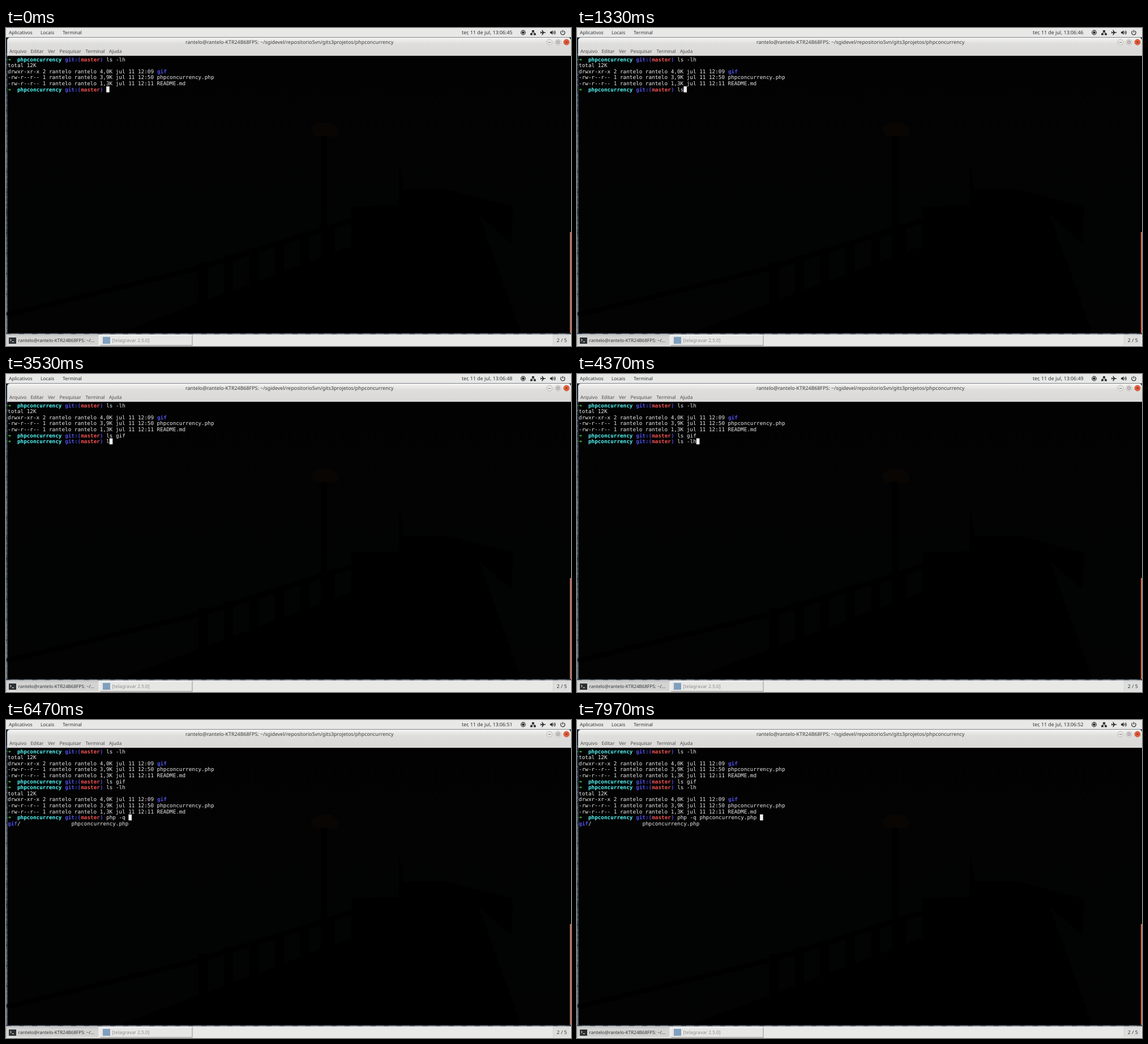
An HTML page with a canvas for the animation above (8 s loop, 998 by 561 pixels).

```html
<!DOCTYPE html>
<html lang="pt">
<head>
<meta charset="utf-8">
<title>Terminal</title>
<style>
html, body { margin: 0; width: 100%; height: 100%; overflow: hidden; background: #000; }
canvas { display: block; }
</style>
</head>
<body>
<canvas id="stage" width="998" height="561"></canvas>
<script>
const ctx = document.getElementById('stage').getContext('2d');
const LOOP = 8000;
const UI = '"Noto Sans", "Open Sans", sans-serif';
const MONO = '"DejaVu Sans Mono", monospace';
const CELL = { x: 3.1, y: 49.9, w: 5.614, h: 10.604 };
const COLOR = { text: '#ececec', green: '#4fe64f', cyan: '#55f5f5', blue: '#5050e6', red: '#ee5151' };
const PROMPT_COLS = 31;

const USER = 'rantelo';
const LOGIN = USER + '@' + USER + '-KTR24B68FPS: ~/';

// Each session line: row, time the prompt appears, and timed keystrokes.
const session = [
  { row: 0, start: 0, keys: [[0, 'ls -lh']] },
  { row: 5, start: 0, keys: [[1070, 'l'], [1200, 's'], [1800, ' '], [2000, 'g'], [2170, 'i'], [2370, 'f']] },
  { row: 6, start: 2870, keys: [[3430, 'l'], [3600, 's'], [3730, ' '], [3870, '-'], [4030, 'l'], [4130, 'h']] },
  { row: 11, start: 4430, keys: [[4770, 'p'], [4900, 'h'], [5030, 'p'], [5170, ' '], [5600, '-'], [5800, 'q'],
    [5970, ' '], [6900, 'p'], [7070, 'h'], [7200, 'p'], [7430, 'concurrency.php ']] }
];
const LIST_TIME = 4430, COMPLETION_TIME = 6270;

function rect(x, y, w, h, color) {
  ctx.fillStyle = color;
  ctx.fillRect(x, y, w, h);
}

function shape(points, color) {
  ctx.fillStyle = color;
  ctx.beginPath();
  points.forEach(([x, y]) => ctx.lineTo(x, y));
  ctx.fill();
}

function line(points, color, width = 1) {
  ctx.strokeStyle = color;
  ctx.lineWidth = width;
  ctx.beginPath();
  points.forEach(([x, y], i) => i ? ctx.lineTo(x, y) : ctx.moveTo(x, y));
  ctx.stroke();
}

function disc(x, y, r, fill, stroke) {
  ctx.beginPath();
  ctx.arc(x, y, r, 0, 7);
  ctx.fillStyle = fill;
  ctx.fill();
  if (stroke) {
    ctx.strokeStyle = stroke;
    ctx.lineWidth = 0.8;
    ctx.stroke();
  }
}

function arc(x, y, r, from, to, color, width = 1) {
  ctx.strokeStyle = color;
  ctx.lineWidth = width;
  ctx.beginPath();
  ctx.arc(x, y, r, from, to);
  ctx.stroke();
}

function vertical(y0, y1, ...colors) {
  const gradient = ctx.createLinearGradient(0, y0, 0, y1);
  colors.forEach((c, i) => gradient.addColorStop(i / (colors.length - 1), c));
  return gradient;
}

function label(text, x, y, size = 8.3, color = '#303436', weight = 400, align = 'left') {
  ctx.font = `${weight} ${size}px ${UI}`;
  ctx.textAlign = align;
  ctx.fillStyle = color;
  ctx.fillText(text, x, y);
}

function mono(text, col, row, color = 'text', bold = false) {
  ctx.font = `${bold ? 'bold ' : ''}9.325px ${MONO}`;
  ctx.textAlign = 'left';
  ctx.fillStyle = COLOR[color];
  ctx.fillText(text, CELL.x + col * CELL.w, CELL.y + row * CELL.h + 8.7);
}

function wallpaper() {
  rect(0, 16, 998, 526, vertical(16, 541, '#17222e', '#34465a', '#59666e', '#36434c', '#546776', '#6d7880'));
  for (let y = 45; y < 540; y += 9) {
    rect(0, y, 2, 3, y % 4 ? 'rgba(150,165,175,.3)' : 'rgba(15,25,35,.45)');
  }
  for (let x = 0; x < 998; x += 23) rect(x, 538, 9, 3, 'rgba(20,30,60,.4)');
}

function terminalBackground() {
  rect(2.5, 49, 995.5, 489.5, vertical(49, 538, '#020202', '#030304', '#020303', '#030303'));
  shape([[538, 178], [550, 168], [575, 167], [588, 180], [584, 192], [545, 191]], '#090502');
  rect(556, 190, 11, 250, '#000');
  shape([[610, 315], [693, 313], [695, 238], [702, 285], [780, 285], [835, 300], [895, 315], [893, 380],
    [835, 330], [910, 538], [200, 538], [610, 385]], '#000');
  line([[2, 506], [340, 424], [610, 340]], '#000', 9);
  for (let x = 340; x < 610; x += 45) rect(x, 505 - x * 0.27, 16, 110, '#000');
}

function topPanel(seconds) {
  rect(0, 0, 998, 16.5, '#e8e8e7');
  label('Aplicativos', 5, 11.2);
  label('Locais', 61, 11.2);
  label('Terminal', 100, 11.2);
  label('ter, 11 de jul, 13:06:' + seconds, 805, 11.2, 8.8);
  const ink = '#25292b';
  arc(913.5, 8, 3.8, 0, 7, ink, 1.2);
  disc(913.5, 8, 2.3, ink);
  rect(929, 4, 4, 3, ink);
  rect(926, 9.5, 4, 3, ink);
  rect(932, 9.5, 4, 3, ink);
  line([[928, 10], [928, 8.3], [934, 8.3], [934, 10]], ink, 0.8);
  line([[931, 6], [931, 8.3]], ink, 0.8);
  shape([[953.5, 8], [952.5, 7.2], [950, 7.2], [947.5, 3.5], [946.3, 3.5], [947.5, 7.2], [945.5, 7.2], [944.5, 6],
    [943.8, 6], [944.4, 8], [943.8, 10], [944.5, 10], [945.5, 8.8], [947.5, 8.8], [946.3, 12.5], [947.5, 12.5],
    [950, 8.8], [952.5, 8.8]], ink);
  shape([[961, 6.5], [963, 6.5], [965.5, 4], [965.5, 12], [963, 9.5], [961, 9.5]], ink);
  [2, 3.6, 5.2].forEach(r => arc(965.3, 8, r, -0.8, 0.8, ink, 0.9));
  arc(983.5, 8.3, 3.7, -0.95, 4.1, ink, 1.2);
  line([[983.5, 3.5], [983.5, 8]], ink, 1.2);
}

function windowFrame() {
  ctx.fillStyle = vertical(17, 49, '#f5f4f3', '#dededc', '#dcdbd9', '#dad9d7');
  ctx.beginPath();
  ctx.roundRect(2, 17, 996, 34, [5, 5, 0, 0]);
  ctx.fill();
  label(LOGIN + 'sgidevel/repositorioSvn/gits3projetos/phpconcurrency', 500.8, 28, 8.9, '#3c3c3c', 500, 'center');
  disc(960, 25, 5, '#e7e6e4', '#b2b0ad');
  disc(975, 25, 5, '#e7e6e4', '#b2b0ad');
  disc(990, 25, 5, '#e8603c', '#c64d30');
  line([[957.7, 25.5], [962.3, 25.5]], '#777');
  ctx.strokeRect(973, 23, 4, 4);
  line([[988, 23], [992, 27]], '#74301f');
  line([[992, 23], [988, 27]], '#74301f');
  const menus = { Arquivo: 6, Editar: 43.5, Ver: 74, Pesquisar: 94.5, Terminal: 140.5, Ajuda: 182 };
  for (const [name, x] of Object.entries(menus)) label(name, x, 44.2, 8.3, '#4c4c4c');
}

function taskButton(x, w, fill, light, dark) {
  rect(x, 542, w, 18.5, fill);
  line([[x, 560], [x, 542.5], [x + w, 542.5]], light);
  line([[x, 560], [x + w, 560], [x + w, 542]], dark);
}

function bottomPanel() {
  rect(0, 540.5, 998, 20.5, '#e8e8e7');
  taskButton(1, 163, '#d3d3d2', '#b5b5b4', '#efefee');
  taskButton(166, 163, '#e6e6e5', '#f6f6f6', '#8f8f8e');
  taskButton(966.5, 30, '#dededd', '#d0d0cf', '#eeeeed');
  rect(5, 546, 13, 11, '#2c3032');
  line([[7, 548.5], [9.5, 550.5], [7, 552.5]], '#f0f0f0');
  line([[10.5, 553.5], [14, 553.5]], '#f0f0f0');
  label(LOGIN + '...', 21.5, 554.2, 8.1, '#303436');
  rect(171, 545, 13, 12, '#7f9fbd');
  label('[telagravar 2.5.0]', 187.5, 554.2, 8.3, '#8c8c8b');
  label('2 / 5', 981.8, 553.7, 8.8, '#303436', 400, 'center');
}

function listing(row) {
  const entry = (mode, links, size, time) =>
    `${mode} ${links} ${USER} ${USER} ${size} jul 11 ${time}`;
  mono('total 12K', 0, row);
  mono(entry('drwxr-xr-x', 2, '4,0K', '12:09'), 0, row + 1);
  mono('gif', 47, row + 1, 'blue', true);
  mono(entry('-rw-r--r--', 1, '3,9K', '12:50') + ' phpconcurrency.php', 0, row + 2);
  mono(entry('-rw-r--r--', 1, '1,3K', '12:11') + ' README.md', 0, row + 3);
}

function prompt(row) {
  mono('➜', 0, row, 'green', true);
  mono('phpconcurrency', 3, row, 'cyan', true);
  mono('git:(', 18, row, 'blue', true);
  mono('master', 23, row, 'red', true);
  mono(')', 29, row, 'blue', true);
}

function terminal(time) {
  let cursor;
  listing(1);
  if (time >= LIST_TIME) listing(7);
  for (const { row, start, keys } of session) {
    if (time < start) continue;
    const typed = keys.filter(([at]) => time >= at).map(([, text]) => text).join('');
    prompt(row);
    mono(typed, PROMPT_COLS, row);
    cursor = { col: PROMPT_COLS + typed.length, row };
  }
  if (time >= COMPLETION_TIME) {
    mono('gif', 0, 12, 'blue', true);
    mono('/', 3, 12);
    mono('phpconcurrency.php', 20, 12);
  }
  rect(CELL.x + cursor.col * CELL.w, CELL.y + cursor.row * CELL.h, CELL.w, CELL.h, '#f2f2f2');
}

function draw(now) {
  const time = now % LOOP;
  ctx.textRendering = 'geometricPrecision';
  wallpaper();
  windowFrame();
  terminalBackground();
  rect(996, 360, 2, 178, '#d4694b');
  topPanel(45 + Math.floor(time / 1000));
  bottomPanel();
  terminal(time);
  requestAnimationFrame(draw);
}
requestAnimationFrame(draw);
</script>
</body>
</html>
```
